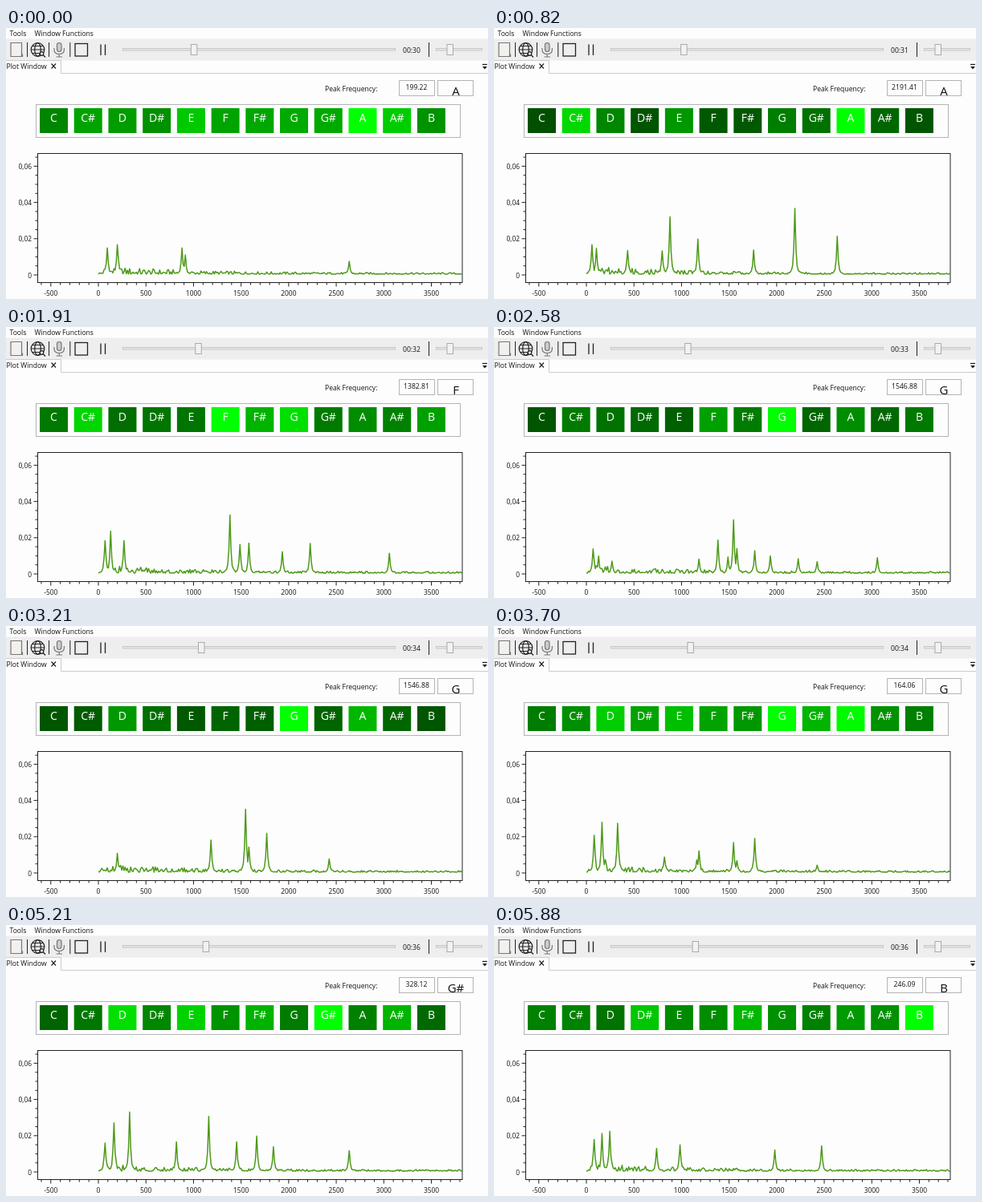
An HTML page for the animation above (5.91 s loop, 600x338 px).

```html
<!DOCTYPE html>
<html lang="en">
<head>
<meta charset="utf-8">
<title>Spectrum and notes</title>
<style>
html, body { margin: 0; width: 100%; height: 100%; overflow: hidden; background: #fdfdfd; }
svg { display: block; width: 100vw; height: 100vh; font-family: "Open Sans", "Noto Sans", sans-serif; font-size: 8.6px; }
</style>
</head>
<body>
<svg id="stage" viewBox="0 0 600 338">
  <rect width="600" height="338" fill="#fdfdfd"/>
  <g fill="#111">
    <text x="4.500" y="10">Tools</text>
    <text x="35.500" y="10">Window Functions</text>
  </g>
  <rect y="13.500" width="600" height="27" fill="#eee"/>
  <g fill="none" stroke="#222">
    <path d="M26.500 18V36M53.500 18V36M79.800 18V36M526.500 18V36"/>
    <g stroke="#777" stroke-width="1.200">
      <path d="M6 18.500H19.500V35.500H6Z" fill="#f1f1ee"/>
      <path d="M16.500 35.500h4v-3"/>
      <rect x="63.500" y="18.500" width="5.500" height="11" rx="2.700" fill="#ccc"/>
      <path d="M60 25v2q0 5.500 6.200 5.500t6.200-5.500v-2M66.200 32.500V36M62.500 36h7.500"/>
    </g>
    <g stroke-width="1.200">
      <circle cx="39.500" cy="27" r="8.300"/>
      <ellipse cx="39.500" cy="27" rx="3.800" ry="8.300"/>
      <path d="M31.200 27H47.800M32.500 22.500H46.500M32.500 31.500H43"/>
      <circle cx="44.500" cy="32" r="2.300" fill="#eee"/>
      <path d="M46 33.500l3 3"/>
    </g>
    <rect x="86" y="19.500" width="15.500" height="15.500" stroke-width="1.300"/>
    <path d="M118 20.500V34M123.500 20.500V34" stroke-width="1.300"/>
  </g>
  <g fill="#e4e4e4" stroke="#c8c8c8">
    <rect x="145.500" y="25.500" width="339" height="2.500"/>
    <rect x="535.500" y="25.500" width="57" height="2.500"/>
  </g>
  <g fill="#f2f2f2" stroke="#aaa">
    <rect id="thumb" y="20.500" width="7.500" height="13"/>
    <rect x="549" y="20.500" width="7.500" height="13"/>
  </g>
  <text id="clock" x="494" y="30.500" fill="#111"></text>
  <path d="M0 40.500H68.500V56.500H600" fill="none" stroke="#ccc"/>
  <text x="0.500" y="51" fill="#111">Plot Window</text>
  <path d="M56.500 44.500l5.500 6M62 44.500l-5.500 6" stroke="#222" stroke-width="1.200"/>
  <path d="M593 45.500h6" stroke="#222" stroke-width="1.300"/>
  <path d="M593 48h6l-3 3.500z" fill="#222"/>
  <text x="397" y="79" fill="#111">Peak Frequency:</text>
  <g fill="none" stroke="#b4b4b4">
    <rect x="489.500" y="65.500" width="44" height="19"/>
    <rect x="537.500" y="65.500" width="44" height="19"/>
    <rect x="37.500" y="95.500" width="528" height="41"/>
  </g>
  <text id="peak" x="511" y="76.600" text-anchor="middle" fill="#111"></text>
  <text id="note" x="560" y="83.500" text-anchor="middle" font-size="15" fill="#111"></text>
  <g id="tiles" text-anchor="middle" font-size="14"></g>
  <path id="curve" fill="none" stroke="#4e9a1a" stroke-width="1.500" stroke-linejoin="round"/>
  <rect x="39.500" y="156.500" width="528.500" height="161" fill="none" stroke="#222"/>
  <g id="axes" fill="#111" font-size="8.400"></g>
</svg>
<script>
const LOOP = 5910, FPS = 33, LAST_STEP = 194, BINS = 327;
const BIN_HZ = 11.71875, PX_PER_HZ = 0.11843, ZERO_X = 115, ZERO_Y = 308;
const NOTES = ['C', 'C#', 'D', 'D#', 'E', 'F', 'F#', 'G', 'G#', 'A', 'A#', 'B'];

const byId = id => document.getElementById(id);
const hash = (a, b) => {
  const s = Math.sin(a * 12.9898 + b * 78.233) * 43758.5453;
  return s - Math.floor(s);
};
function add(parent, tag, attrs, text = '') {
  const el = document.createElementNS('http://www.w3.org/2000/svg', tag);
  for (const key in attrs) el.setAttribute(key, attrs[key]);
  el.textContent = text;
  return parent.appendChild(el);
}

// The chords heard: a step and the [bin, height] of the main partials.
const chord = (step, ...peaks) => ({ step, peaks });
const chords = [
  chord(0, [8, 32], [17, 37], [75, 33], [78, 22], [225, 16]),
  chord(27, [5, 37], [9, 31], [37, 29], [68, 28], [75, 72], [100, 43], [150, 29], [187, 82], [225, 47]),
  chord(63, [6, 41], [11, 48], [23, 39], [118, 73], [127, 36], [135, 37], [165, 27], [190, 37], [261, 25]),
  chord(106, [17, 20], [101, 40], [132, 78], [135, 31], [151, 49], [207, 17]),
  chord(139, [7, 64], [14, 89], [28, 86], [70, 25], [99, 36]),
  chord(172, [6, 35], [14, 60], [28, 73], [70, 35], [99, 68], [124, 37], [142, 44], [157, 31], [225, 26]),
  chord(LAST_STEP, [7, 40], [14, 43], [21, 50], [63, 29], [84, 33], [169, 27], [211, 32]),
];

const tiles = NOTES.map((name, i) => {
  const x = 42 + i * 42.72;
  const tile = add(byId('tiles'), 'rect', { x, y: 100, width: 35, height: 31 });
  add(byId('tiles'), 'text', { x: x + 17.5, y: 116.5, fill: '#fff' }, name);
  return tile;
});

const axes = byId('axes');
let ticks = '';
for (let hz = -600; hz <= 3800; hz += 100) {
  const x = ZERO_X + hz * PX_PER_HZ, major = hz % 500 === 0;
  ticks += `M${x} 317.500v${major ? 5 : 3}`;
  if (major) add(axes, 'text', { x, y: 333.5, 'text-anchor': 'middle' }, hz);
}
for (let i = 0; i <= 13; i++) {
  const y = ZERO_Y - i * 11.3, major = i % 4 === 0;
  ticks += `M39.500 ${y}h${major ? -5 : -3}`;
  if (major) add(axes, 'text', { x: 32, y: y + 3.6, 'text-anchor': 'end' }, i ? `0,0${i / 2}` : '0');
}
add(axes, 'path', { d: ticks, stroke: '#222' });

// Two decimals, halves to even.
function twoDecimals(value) {
  const scaled = value * 100;
  let rounded = Math.round(scaled);
  if (scaled % 1 === 0.5 && rounded % 2) rounded--;
  return (rounded / 100).toFixed(2);
}

// Noise is strongest in the bass and fades in over the first bins.
const noise = (k, step) =>
  1 + hash(k, step + 1) ** 2 * (1.8 + 9 * Math.exp(-k / 80)) * Math.min(1, (k + 1) / 8);

function spectrumAt(step) {
  const next = Math.max(1, chords.findIndex(c => c.step >= step));
  const from = chords[next - 1], to = chords[next];
  const p = (step - from.step) / (to.step - from.step);
  const mix = p * p * (3 - 2 * p), sway = 0.35 * Math.sin(Math.PI * p);

  const bins = Array.from({ length: BINS }, (_, k) => noise(k, step));
  const lay = (peaks, weight) => peaks.forEach(([bin, height]) => {
    const top = height * weight ** 0.7 * (1 + sway * Math.sin(step * 0.45 + bin * 2.1));
    for (let k = Math.max(0, bin - 6); k <= bin + 6; k++) {
      bins[k] = Math.max(bins[k], top / (1 + 1.6 * (k - bin) ** 2) + noise(k, step) / 2);
    }
  });
  lay(from.peaks, 1 - mix);
  lay(to.peaks, mix);
  return bins;
}

// Each note's level is the sum of its octaves, relative to the loudest note.
function levelsOf(bins) {
  const sums = NOTES.map(() => 70);
  for (let k = 4; k < BINS; k++) {
    const semitones = Math.round(12 * Math.log2(k * BIN_HZ / 440));
    sums[(semitones + 57) % 12] += bins[k] * Math.min(1, k / 50);
  }
  const top = Math.max(...sums);
  return sums.map(sum => Math.round(sum / top * 255));
}

function draw(time) {
  const step = Math.min(LAST_STEP, Math.floor((time / 10 + 0.5) * FPS / 100));
  const seconds = step / FPS;
  const bins = spectrumAt(step);
  const levels = levelsOf(bins);

  byId('curve').setAttribute('d', 'M' + bins.map((h, k) =>
    `${(ZERO_X + k * BIN_HZ * PX_PER_HZ).toFixed(2)} ${(ZERO_Y - h).toFixed(2)}`).join('L'));
  tiles.forEach((tile, i) => tile.setAttribute('fill', `rgb(0,${levels[i]},0)`));
  byId('peak').textContent = twoDecimals(bins.indexOf(Math.max(...bins)) * BIN_HZ);
  byId('note').textContent = NOTES[levels.indexOf(255)];
  byId('clock').textContent = `00:${Math.floor(30.85 + seconds)}`;
  byId('thumb').setAttribute('x', 230.3 + seconds * 2.85);
}

const start = performance.now();
function tick(now) {
  draw(Math.max(0, now - start) % LOOP);
  requestAnimationFrame(tick);
}
draw(0);
requestAnimationFrame(tick);
</script>
</body>
</html>
```
